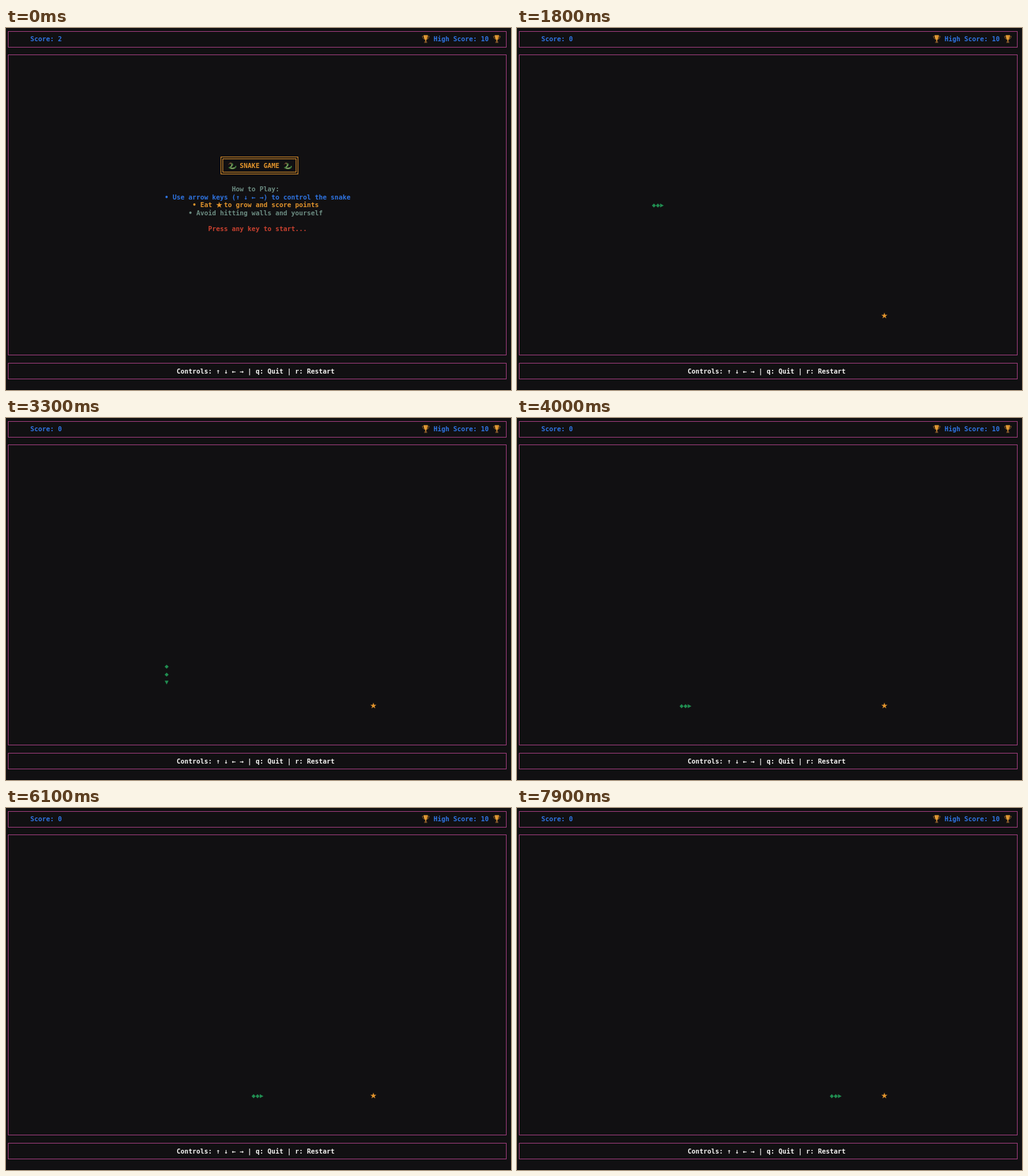
An HTML page with a canvas for the animation above (8 s loop, 800 by 574 pixels).

```html
<!DOCTYPE html>
<html lang="en">
<head>
<meta charset="utf-8">
<title>Snake game</title>
<style>
html, body { margin: 0; width: 100%; height: 100%; overflow: hidden; background: #111012; }
canvas { display: block; }
</style>
</head>
<body>
<canvas id="stage" width="800" height="574"></canvas>
<script>
const ctx = document.getElementById('stage').getContext('2d');
const CELL = 6.262, LINE = 12.534;
const BLUE = '#2f74e2', ORANGE = '#e2942c', GREEN = '#208c50',
      GREY = '#6c8c82', RED = '#c8402f', WHITE = '#f4f4f2';
const LOOP = 8000, TICK = 100, START = 1300;

// Centre of a terminal cell
const cx = col => 4 + col * CELL;
const cy = row => 5 + row * LINE;

function text(str, col, row, color) {
  ctx.fillStyle = color;
  [...str].forEach((ch, i) => ctx.fillText(ch, cx(col + i), cy(row) + 3.7));
}

function poly(points, color) {
  ctx.fillStyle = color;
  ctx.beginPath();
  points.forEach(([x, y]) => ctx.lineTo(x, y));
  ctx.fill();
}

function path(d, color, width) {
  const p = new Path2D(d);
  if (width) {
    ctx.strokeStyle = color;
    ctx.lineWidth = width;
    ctx.stroke(p);
  } else {
    ctx.fillStyle = color;
    ctx.fill(p);
  }
}

function at(x, y, draw) {
  ctx.save();
  ctx.translate(x, y);
  draw();
  ctx.restore();
}

function star(col, row) {
  const pts = Array.from({ length: 10 }, (_, i) => {
    const r = i % 2 ? 2 : 5.1, a = i * Math.PI / 5;
    return [cx(col) + 1.9 + r * Math.sin(a), cy(row) + 0.1 - r * Math.cos(a)];
  });
  poly(pts, ORANGE);
}

function trophy(x, y) {
  at(x, y, () => {
    path('M-3 -4.4H-5.5Q-5.2 -.6 -1.5 .8M3 -4.4H5.5Q5.2 -.6 1.5 .8', '#a86a22', 0.8);
    path('M-3.4 -6.2H3.4Q3.3 -.6 .8 1.4V3.6H-.8V1.4Q-3.3 -.6 -3.4 -6.2Z', '#d98f2c');
    path('M-1.6 -5Q-1.5 -1.8 -.4 0', '#f0c468', 0.8);
    path('M-2 3.4H2L2.7 6.3H-2.7Z', '#5a3a22');
    path('M-1.2 4.7H1.2', '#c08a38', 0.9);
  });
}

function snakeIcon(x, y) {
  at(x, y, () => {
    ctx.lineCap = 'round';
    path('M-2.8 -3.3Q1.5 -3.5 -.3 -.4Q-2.6 2 -4.5 3.2Q-1 5.3 2.8 4Q5 3 5.3 1.3', '#3f7b3a', 2.2);
    path('M-1.1 -1.8Q0 -.6 -2.3 1.4M-2.8 3.8Q0 4.8 3 3.5', '#d3c793', 0.9);
    path('M-5.3 -3.5Q-3.3 -6 -.8 -4.2L-2 -2.2Z', '#6c5438');
    path('M-5.1 -3L-6 -2', '#c4472f', 0.7);
  });
}

// Fine dotted frame around a range of rows
function frame(top, bottom) {
  const y = Math.floor(cy(top)) + 0.5, h = Math.floor(cy(bottom)) + 0.5 - y;
  ctx.lineWidth = 1;
  ctx.strokeStyle = '#6c2a57';
  ctx.strokeRect(3.5, y, 789, h);
  ctx.setLineDash([1, 1]);
  ctx.strokeStyle = '#dc52aa';
  ctx.strokeRect(3.5, y, 789, h);
  ctx.setLineDash([]);
}

function intro() {
  ctx.strokeStyle = ORANGE;
  ctx.lineWidth = 1;
  ctx.strokeRect(340.5, 204.5, 122, 27);
  ctx.strokeRect(343.5, 207.5, 116, 21);
  snakeIcon(358.7, 218.3);
  snakeIcon(446.7, 218.3);
  text('SNAKE GAME', 59, 17, ORANGE);
  text('How to Play:', 57, 20, GREY);
  text('• Use arrow keys (↑ ↓ ← →) to control the snake', 40, 21, BLUE);
  text('• Eat', 47, 22, ORANGE);
  star(53, 22);
  text('to grow and score points', 55, 22, ORANGE);
  text('• Avoid hitting walls and yourself', 46, 23, GREY);
  text('Press any key to start...', 51, 25, RED);
}

// Route: right to column 40, down to row 36, then right again
function route(step) {
  if (step <= 9) return [31 + step, 22];
  if (step <= 23) return [40, 13 + step];
  return [17 + step, 36];
}

function snake(time) {
  let step = Math.floor((time - START) / TICK);
  // The game tick lags slightly, so two display ticks show no move
  if (time >= 3700) step--;
  if (time >= 6300) step--;
  for (let i = 1; i < 3; i++) {
    const [c, r] = route(step - i), x = cx(c), y = cy(r) + 0.8;
    poly([[x, y - 3.2], [x + 3.2, y], [x, y + 3.2], [x - 3.2, y]], GREEN);
  }
  const [c, r] = route(step), x = cx(c), y = cy(r) + 0.7;
  const down = step > 9 && step <= 23;
  poly(down
    ? [[x - 3.1, y - 2.8], [x + 3.1, y - 2.8], [x, y + 3.1]]
    : [[x - 2.8, y - 3.1], [x + 3.1, y], [x - 2.8, y + 3.1]], GREEN);
}

function draw(now) {
  const time = now % LOOP, playing = time >= START;
  ctx.fillStyle = '#111012';
  ctx.fillRect(0, 0, 800, 574);
  ctx.fillStyle = '#08080a';
  ctx.fillRect(0, 573, 800, 1);
  ctx.font = 'bold 10.4px "DejaVu Sans Mono", monospace';
  ctx.textAlign = 'center';

  frame(0, 2);
  frame(3, 41);
  frame(42, 44);
  text('Score: ' + (playing ? 0 : 2), 6, 1, BLUE);
  trophy(664.9, 17.5);
  text('High Score: 10', 108, 1, BLUE);
  trophy(777.6, 17.5);
  text('Controls: ↑ ↓ ← → | q: Quit | r: Restart', 43, 43, WHITE);

  if (playing) {
    star(92, 36);
    snake(time);
  } else {
    intro();
  }
}

const begin = performance.now();
function tick() {
  draw(performance.now() - begin);
  requestAnimationFrame(tick);
}
tick();
</script>
</body>
</html>
```
